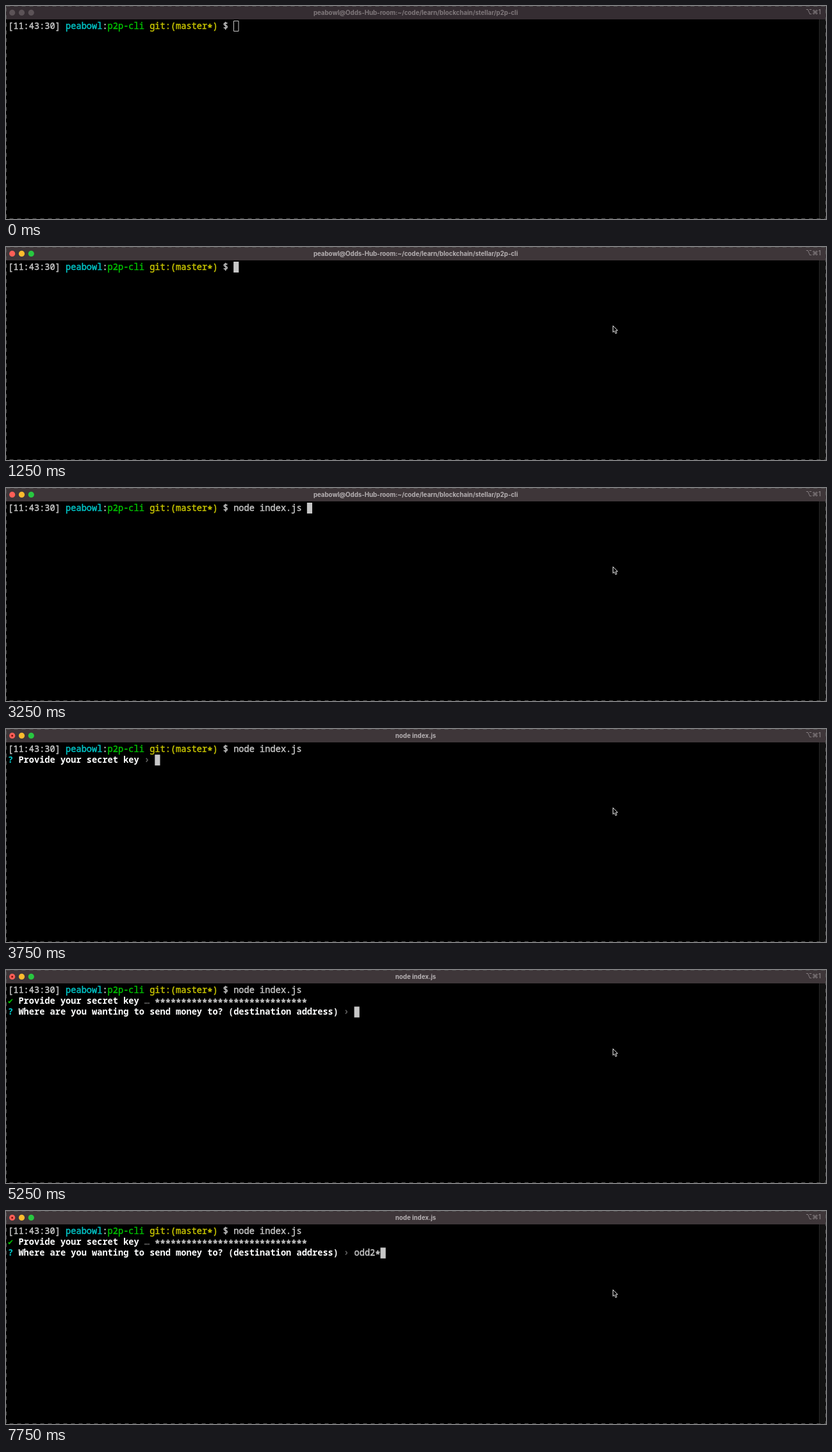
Animation, 1280 px wide and 334 px high, one loop 8000 ms. Source, as an HTML page with a canvas:

```html
<!DOCTYPE html>
<html lang="en">
<head>
<meta charset="utf-8">
<title>Terminal</title>
<style>
html, body { margin: 0; width: 100%; height: 100%; overflow: hidden; background: #000; }
canvas { display: block; width: 1280px; height: 334px; }
</style>
</head>
<body>
<canvas id="stage" width="1280" height="334"></canvas>
<script>
const ctx = document.getElementById('stage').getContext('2d');
const W = 1280, H = 334, LOOP = 8000;
const CELL = 8.19, LEFT = 3, TOP = 23, ROW = 17.2, BASE = 36;
const MONO = "13.65px 'Noto Sans Mono', 'DejaVu Sans Mono', monospace";
const C = {
  fg: '#c7c7c7', white: '#feffff', cyan: '#00c5c7', green: '#00c200',
  yellow: '#c7c400', dim: '#686868'
};

const USER = 'peabowl';
const PATH_TITLE = USER + '@Odds-Hub-room:~/code/learn/blockchain/stellar/p2p-cli';
const COMMAND = 'node index.js ';
const ADDRESS = 'odd2*';
const SECRET = '*'.repeat(29);

// Pairs of [time, value]; the last one reached holds.
const AT = {
  command: [[0, 0], [2000, 1], [2250, 5], [2500, 8], [2750, 14]],
  address: [[0, 0], [5750, 1], [6000, 3], [6250, 4], [7500, 5]]
};
const FOCUS = 750, RUN = 3500, ASK_KEY = 3750, PASTE = 4250, ASK_DEST = 5250;

const valueAt = (steps, t) => steps.filter(s => s[0] <= t).pop()[1];

function rect(x, y, w, h, color) {
  ctx.fillStyle = color;
  ctx.fillRect(x, y, w, h);
}

function disc(x, y, r, color) {
  ctx.fillStyle = color;
  ctx.beginPath();
  ctx.arc(x, y, r, 0, Math.PI * 2);
  ctx.fill();
}

function label(text, x, y, font, color, align) {
  ctx.font = font;
  ctx.fillStyle = color;
  ctx.textAlign = align;
  ctx.fillText(text, x, y);
}

// Prints runs of [text, color, bold] on the grid and returns the next column.
// A thin outline turns the regular weight into a medium one.
function print(row, runs) {
  let col = 0;
  ctx.textAlign = 'left';
  ctx.lineWidth = 0.45;
  ctx.lineJoin = 'round';
  for (const [text, color, bold] of runs) {
    ctx.fillStyle = ctx.strokeStyle = color;
    for (const ch of text) {
      const star = ch === '*';
      const x = LEFT + col * CELL, y = BASE + row * ROW + (star ? 3 : 0);
      ctx.font = (bold || star ? 700 : 400) + ' ' + MONO;
      ctx.fillText(ch, x, y);
      if (!bold) ctx.strokeText(ch, x, y);
      col++;
    }
  }
  return col;
}

function cursor(row, col, solid) {
  const x = LEFT + col * CELL, y = TOP + row * ROW;
  if (solid) {
    rect(x, y, CELL, 17, C.fg);
  } else {
    ctx.strokeStyle = C.fg;
    ctx.lineWidth = 1;
    ctx.strokeRect(Math.round(x) + 0.5, y + 0.5, 7.5, 16);
  }
}

function titleBar(t) {
  const active = t >= FOCUS, running = t >= RUN;
  rect(0, 0, W, 21, active ? '#3e3639' : '#352d32');
  const lights = active ? ['#ff5f57', '#febc2e', '#28c840'] : Array(3).fill('#5c5357');
  lights.forEach((color, i) => disc(9.7 + i * 14.8, 10.4, 4.6, color));
  if (running) disc(9.7, 10.4, 1.5, '#7d0f0a');
  label(running ? 'node index.js' : PATH_TITLE, 639.5, 13.5,
    "700 9.7px Inter, 'Liberation Sans', sans-serif", active ? '#b7b2b4' : '#80797c', 'center');
  label('⌥⌘1', 1272, 13, "500 9.8px Inter, 'DejaVu Sans', sans-serif", '#8a8386', 'right');
}

function frame() {
  rect(1269, 21, 11, H - 21, '#121212');
  rect(1269, 21, 1, H - 21, '#262626');
  ctx.lineWidth = 1;
  ctx.strokeStyle = '#525252';
  ctx.setLineDash([6, 6]);
  ctx.strokeRect(0.5, 0.5, W - 1, H - 1);
  ctx.setLineDash([]);
}

function shell(t) {
  const typed = COMMAND.slice(0, valueAt(AT.command, t));
  const end = print(0, [
    ['[11:43:30] ', C.fg], [USER, C.cyan], [':', C.fg], ['p2p-cli ', C.green],
    ['git:(master*) ', C.yellow], ['$ ' + typed, C.fg]
  ]);
  if (t < RUN) return cursor(0, end, t >= FOCUS);
  if (t < ASK_KEY) return cursor(1, 0, true);

  const done = t >= ASK_DEST;
  const keyEnd = print(1, [
    done ? ['✔ ', C.green, true] : ['? ', C.cyan, true],
    ['Provide your secret key', C.white, true],
    [done ? ' … ' : ' › ', C.dim],
    [t >= PASTE ? SECRET : '', C.fg]
  ]);
  if (!done) return cursor(1, keyEnd, true);

  const destEnd = print(2, [
    ['? ', C.cyan, true],
    ['Where are you wanting to send money to? (destination address)', C.white, true],
    [' › ', C.dim],
    [ADDRESS.slice(0, valueAt(AT.address, t)), C.fg]
  ]);
  cursor(2, destEnd, true);
}

function pointer(t) {
  if (t < 250) return;
  const [x, y] = t < 500 ? [1067.5, 116.5] : [947.5, 123.5];
  const arrow = new Path2D('M0 0V10.2L2.3 8.1L4 12.2L5.9 11.4L4.2 7.5H7.3Z');
  ctx.save();
  ctx.translate(x, y);
  ctx.fillStyle = '#000';
  ctx.strokeStyle = '#e4e4e4';
  ctx.lineWidth = 1;
  ctx.fill(arrow);
  ctx.stroke(arrow);
  ctx.restore();
}

function draw(t) {
  rect(0, 0, W, H, '#000');
  titleBar(t);
  frame();
  shell(t);
  pointer(t);
}

const start = performance.now();
function tick() {
  draw((performance.now() - start) % LOOP);
  requestAnimationFrame(tick);
}
tick();
</script>
</body>
</html>
```
